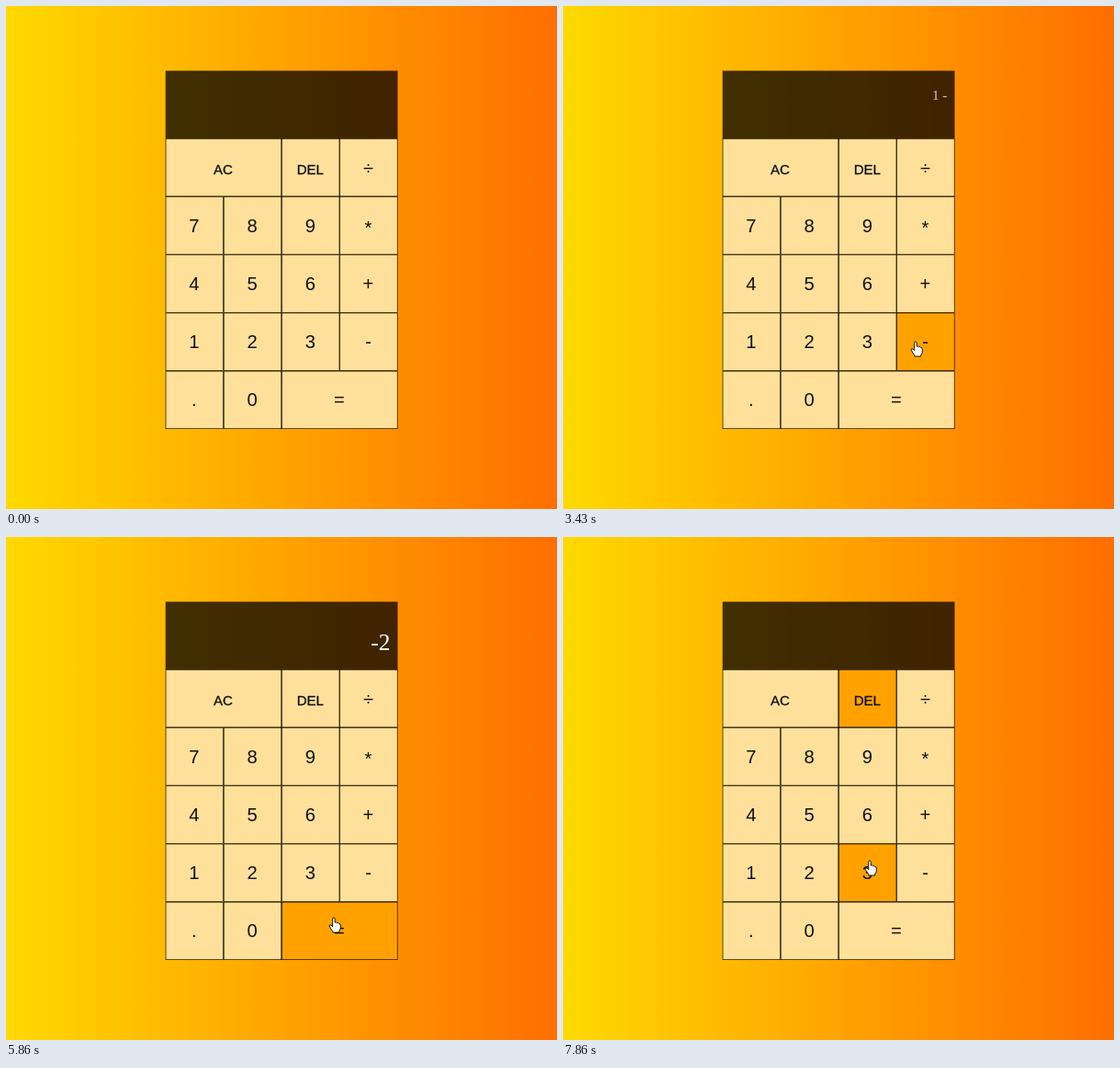
These frames come from a looping animation (600 px wide and 547 px high, 8000 ms). An HTML page:

```html
<!DOCTYPE html>
<html lang="en">
<head>
<meta charset="utf-8">
<title>Calculator</title>
<style>
  html, body { margin: 0; height: 100%; overflow: hidden; }
  svg { display: block; width: 600px; height: 547px; background: linear-gradient(to right, #ffd900, #ff6e00); }
  .key rect { fill: #ffe09a; stroke: #000; stroke-width: .64; }
  .key.lit rect { fill: #ffa200; }
  .key text { font: 20.2px "Liberation Sans", Arial, sans-serif; text-anchor: middle; fill: #111; }
  .key text.word { font-size: 15px; stroke: #111; stroke-width: .3; }
  .out { font-family: "Liberation Serif", "Times New Roman", serif; text-anchor: end; fill: #fff; }
</style>
</head>
<body>
<svg id="stage" viewBox="0 0 600 547">
  <rect x="173.7" y="70.4" width="252.8" height="73.6" fill="#000" fill-opacity=".75"/>
  <text id="previous" class="out" x="418.4" y="102" font-size="15.2" fill-opacity=".75"></text>
  <text id="current" class="out" x="418.4" y="123" font-size="25.3"></text>
  <g id="keys"></g>
  <path id="hand" fill="#fff" stroke="#000" stroke-width=".9" stroke-linejoin="round"
    d="M-1.3 1.2C-1.3-.4 1.2-.4 1.2 1.2V5.2Q2.6 4.4 3.5 5.8Q5 5 5.7 6.6Q7.3 6.2 7.3 8V11Q7.3 13 5.8 14.2V16H-1.2V14.6Q-3.5 12-4.9 9.2Q-5.2 7.2-3 8L-1.3 9.6Z"/>
</svg>
<script>
const FPS = 7, TICKS = 56, CELL = 63.2, LEFT = 173.7, TOP = 144;
const $ = id => document.getElementById(id);

// Doubled labels span two columns.
const rows = [
  ['AC', 'AC', 'DEL', '÷'],
  ['7', '8', '9', '*'],
  ['4', '5', '6', '+'],
  ['1', '2', '3', '-'],
  ['.', '0', '=', '=']
];

// Pointer path: tick, x, y
const path = [
  [1, 273, 426], [8, 273, 426], [14, 208, 366], [16, 208, 366],
  [18, 329, 366], [21, 388, 366], [24, 384, 365], [29, 336, 362],
  [31, 336, 362], [39, 357, 414], [44, 357, 414], [48, 353, 196],
  [52, 345, 174], [55, 334, 352]
];

// Presses: tick, focused key, previous line, current line
const presses = [
  [0, '', '', ''],
  [16, '1', '', '1'],
  [22, '-', '1 -', ''],
  [30, '3', '1 -', ''],
  [31, '3', '1 -', '3'],
  [38, '=', '', '-2'],
  [49, 'DEL', '', '-2'],
  [50, 'DEL', '', '-'],
  [51, 'DEL', '', '']
];

function add(parent, tag, attrs) {
  const el = document.createElementNS('http://www.w3.org/2000/svg', tag);
  for (const name in attrs) el.setAttribute(name, attrs[name]);
  return parent.appendChild(el);
}

const keys = {};
rows.forEach((row, r) => row.forEach((label, c) => {
  if (keys[label]) return;
  const width = CELL * row.filter(other => other === label).length;
  const x = LEFT + c * CELL, y = TOP + r * CELL;
  const key = keys[label] = add($('keys'), 'g', { class: 'key' });
  add(key, 'rect', { x: x + .32, y: y + .32, width: width - .64, height: CELL - .64 });
  add(key, 'text', {
    x: x + width / 2 - .4,
    y: y + (label === '*' ? 41 : 38.5),
    class: label.length > 1 ? 'word' : ''
  }).textContent = label;
}));

function pointerAt(tick) {
  const next = path.findIndex(point => point[0] >= tick);
  if (next < 1) return path[0].slice(1);
  const [t0, x0, y0] = path[next - 1], [t1, x1, y1] = path[next];
  const k = (tick - t0) / (t1 - t0);
  return [x0 + (x1 - x0) * k, y0 + (y1 - y0) * k];
}

function draw(tick) {
  const [x, y] = pointerAt(tick);
  const visible = tick > 0;
  const hovered = visible && rows[Math.floor((y - TOP) / CELL)][Math.floor((x - LEFT) / CELL)];
  const [, focused, previous, current] = presses.filter(press => press[0] <= tick).pop();

  for (const label in keys) {
    keys[label].classList.toggle('lit', label === hovered || label === focused);
  }
  $('previous').textContent = previous;
  $('current').textContent = current;
  $('hand').setAttribute('visibility', visible ? 'visible' : 'hidden');
  $('hand').setAttribute('transform', `translate(${x} ${y})`);
}

// The small offset absorbs the rounding of tick times.
function loop() {
  draw(Math.floor((performance.now() + 3) * FPS / 1000) % TICKS);
  requestAnimationFrame(loop);
}
loop();
</script>
</body>
</html>
```
